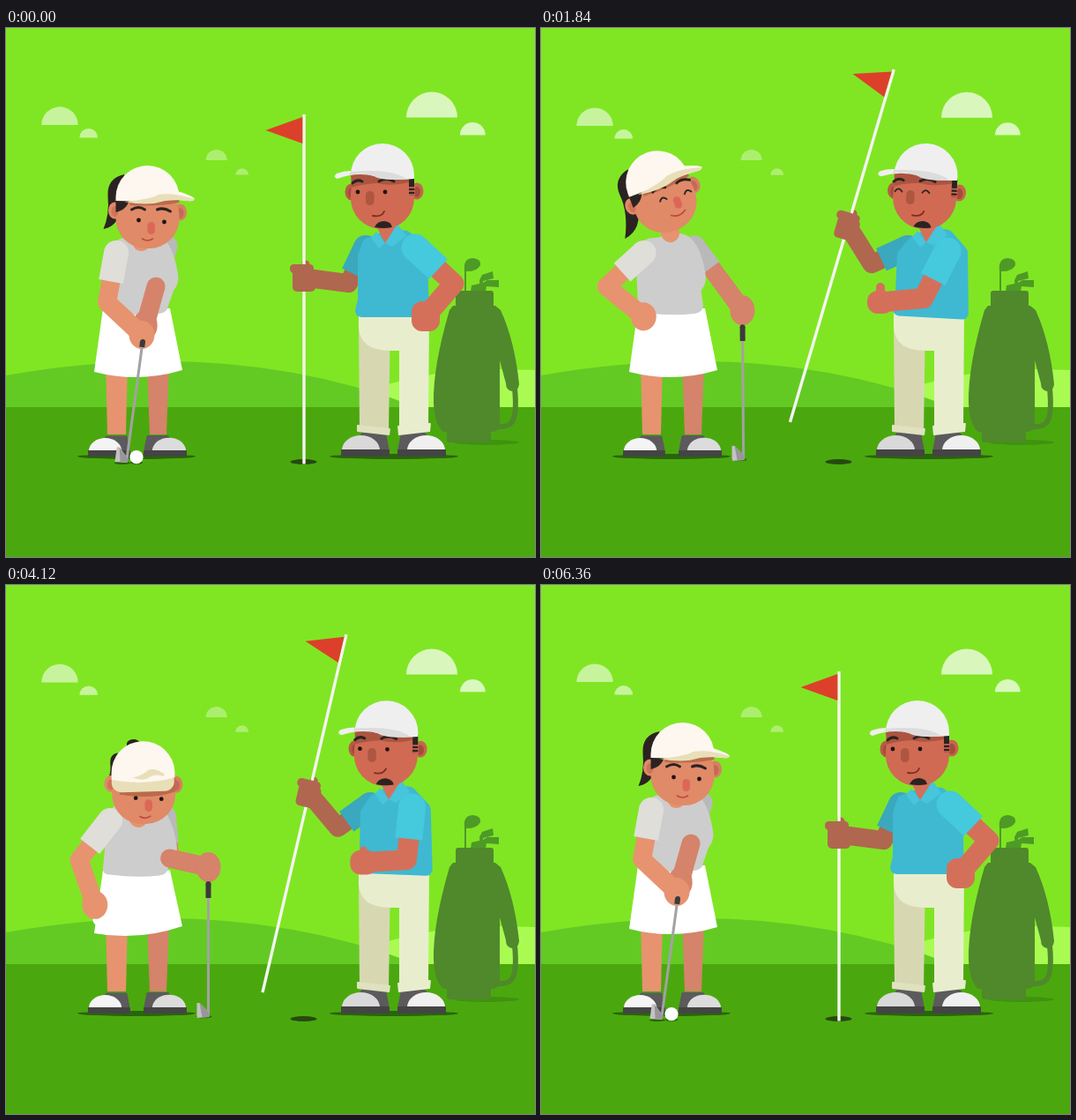
An HTML page with a canvas for the animation above (6.4 s loop, 600 px wide and 600 px high).

```html
<!DOCTYPE html>
<html lang="en">
<head>
<meta charset="utf-8">
<title>Putting green</title>
<style>
html, body { margin: 0; width: 100%; height: 100%; overflow: hidden; background: #80e623; }
canvas { display: block; width: 600px; height: 600px; }
</style>
</head>
<body>
<canvas id="stage" width="600" height="600"></canvas>
<script>
const c = document.getElementById('stage').getContext('2d');
const LOOP = 6400, STEP = 40;
const DARK = '#2b2322', SHADE = '#2a640b';

// ---- drawing ----
function shape(fill, d) {
  c.fillStyle = fill;
  c.fill(new Path2D(d));
}
function curve(color, w, d, cap = 'round') {
  c.strokeStyle = color;
  c.lineWidth = w;
  c.lineCap = cap;
  c.lineJoin = 'round';
  c.stroke(new Path2D(d));
}
function poly(fill, p, r = 0) {
  const n = p.length;
  c.beginPath();
  c.moveTo((p[0] + p[n - 2]) / 2, (p[1] + p[n - 1]) / 2);
  for (let i = 0; i < n; i += 2) c.arcTo(p[i], p[i + 1], p[(i + 2) % n], p[(i + 3) % n], r);
  c.fillStyle = fill;
  c.fill();
}
const box = (fill, x, y, w, h, r) => poly(fill, [x, y, x + w, y, x + w, y + h, x, y + h], r);
function oval(fill, x, y, rx, ry = rx) {
  c.beginPath();
  c.ellipse(x, y, rx, ry, 0, 0, 7);
  c.fillStyle = fill;
  c.fill();
}
function local(x, y, deg, draw) {
  c.save();
  c.translate(x, y);
  c.rotate(deg * Math.PI / 180);
  draw();
  c.restore();
}
function above(y, draw) {
  c.save();
  c.beginPath();
  c.rect(0, 0, 600, y);
  c.clip();
  draw();
  c.restore();
}

// ---- motion ----
const clamp = u => Math.min(1, Math.max(0, u));
const ease = u => u * u * (3 - 2 * u);
const lerp = (a, b, u) => a + (b - a) * u;
function mix(a, b, u) {
  const pose = {};
  for (const k in a) pose[k] = lerp(a[k], b[k], u);
  return pose;
}
// Each move is [start, end, pose]; between moves the pose holds.
const poseAt = (start, moves, t) => moves.reduce(
  (p, [from, to, next]) => mix(p, next, ease(clamp((t - from) / (to - from)))), start);

// Two-bone arm: shoulder, elbow, hand. The sign of bend picks the elbow's side.
function joints(sx, sy, hx, hy, upper, lower, bend) {
  const d = Math.hypot(hx - sx, hy - sy), ux = (hx - sx) / d, uy = (hy - sy) / d;
  const reach = Math.min(d, upper + lower);
  const a = (upper ** 2 - lower ** 2 + reach ** 2) / (2 * reach);
  const h = bend * Math.sqrt(Math.max(0, upper ** 2 - a ** 2));
  return [sx, sy, sx + ux * a + uy * h, sy + uy * a - ux * h, hx, hy];
}
const arm = (color, a, w) => curve(color, w, `M${a[0]} ${a[1]}L${a[2]} ${a[3]}L${a[4]} ${a[5]}`);
const forearm = (color, a, w) => curve(color, w, `M${a[2]} ${a[3]}L${a[4]} ${a[5]}`);
function sleeve(color, [sx, sy, ex, ey], w, len) {
  const k = len / Math.hypot(ex - sx, ey - sy);
  oval(color, sx, sy, w / 2);
  curve(color, w, `M${sx} ${sy}L${lerp(sx, ex, k)} ${lerp(sy, ey, k)}`, 'butt');
}

// ---- poses: head x, y, tilt; near hand nx, ny; club grip gx, gy, angle, length; far elbow bend ----
const address = { x: 160.5, y: 192, tilt: 0, nx: 154, ny: 348, gx: 155, gy: 356, swing: 7.7, len: 135, bend: 1 };
const back = { ...address, x: 155.5, tilt: -2, nx: 152, gx: 152, gy: 357, swing: 15.6 };
const through = { x: 141, y: 184, tilt: -18, nx: 179, ny: 338, gx: 183, gy: 348, swing: -20.7, len: 136, bend: 1 };
const rest = { x: 132, y: 175, tilt: -21, nx: 115, ny: 327, gx: 229.5, gy: 339, swing: 0, len: 148, bend: 0 };
const pocket = { ...rest, x: 143, y: 179, tilt: -13, nx: 87, ny: 330, bend: -1 };
const bowed = { ...pocket, x: 162, y: 231, tilt: 4, nx: 108, ny: 380 };
const herMoves = [[60, 440, back], [440, 900, through], [1180, 1900, rest], [2760, 3400, pocket],
  [3720, 4380, bowed], [4660, 5200, back], [5500, 6080, address]];

// head x, y, tilt; body turn and lean; pole hand hx, hy and pole angle
const hold = { x: 427, y: 167, tilt: 0, turn: 0, lean: 0, hx: 338, hy: 283, angle: 0 };
const lift = { ...hold, x: 420, y: 169, tilt: -8, lean: 1, hx: 342, hy: 250, angle: .7 };
const cheer = { x: 436.5, y: 167, tilt: 3, turn: 1, lean: 0, hx: 348, hy: 224.5, angle: 16.4 };
const sway = { ...cheer, hx: 345.5, hy: 221.5, angle: 17 };
const watch = { ...hold, x: 414, y: 168.5, tilt: -5, lean: -5 };
const plant = { ...watch, hy: 287 };
const hisMoves = [[620, 1080, lift], [1080, 1840, cheer], [2540, 2740, sway], [3960, 4480, plant],
  [4600, 4760, watch], [5500, 6080, hold]];

// ---- scenery ----
function cloud(x, y, r, alpha) {
  shape(`rgba(255,255,255,${alpha})`, `M${x - r} ${y}A${r} ${r} 0 0 1 ${x + r} ${y}Z`);
}
function scenery(t) {
  const bob = lag => -Math.cos(2 * Math.PI * (3 * t / LOOP - lag));
  c.fillStyle = '#80e623';
  c.fillRect(0, 0, 600, 600);
  const left = bob(.08) * 1.6, right = bob(-.04) * 1.25, mid = bob(.4) * .4;
  cloud(61, 111.4 + left, 20.7, .55);
  cloud(93.7, 125.8 + left, 10.4, .55);
  cloud(483, 102.8 + right, 29, .7);
  cloud(529.3, 122.6 + right, 14.4, .7);
  cloud(238.7, 149.7 + mid, 12, .35);
  cloud(267.7, 166.3 + mid, 7.4, .35);

  shape('#a9fb52', 'M420 408Q490 386 560 387L600 388V430H420Z');
  shape('#63ca24', 'M0 394Q90 378 178 378Q330 378 466 430H0Z');
  c.fillStyle = '#4aa80e';
  c.fillRect(0, 430, 600, 170);

  oval('#3f930f', 545, 470, 37, 3);
  oval(SHADE, 440, 486, 73, 3);
  oval(SHADE, 148, 486, 67, 3);
  oval('#27490f', 337.5, 492, 15, 3);
}
function bag() {
  const g = '#50882c', lit = '#4d9a26';
  curve(lit, 2, 'M521 300V268', 'butt');
  shape(lit, 'M520 276Q518 261 530 261Q539 262 538 269Q534 277 520 276Z');
  shape(lit, 'M537 286L540 280L552 276L553 284L541 287V299H538Z');
  shape(lit, 'M527 299L528 292L541 289L546 286H559V294L545 293L544 299Z');
  box(g, 510, 298, 43, 22, 3);
  shape(g, 'M507 315H555L560 321V450Q559 458 551 458H496Q486 450 485 425Q484 385 503 320Z');
  shape(g, 'M556 316L561 320Q577 355 582 404Q581 412 574 412Q567 411 567 403L556 362Z');
  curve(g, 6, 'M577 409Q580 440 573 448Q568 453 557 452');
  box(g, 500, 455, 50, 15, 3);
}
function shoe(x, dir, size, toe) {
  c.save();
  c.translate(x, 486);
  c.scale(dir * size, size);
  poly('#5c5a5c', [23, -27, 51, -27, 55, -6, 15, -6], 2);
  shape(toe, 'M1 -7A21.5 17 0 0 1 44 -7Z');
  box('#444', 0, -8, 55, 8, 1);
  c.restore();
}

// ---- faces ----
function eyes(ax, ay, bx, by, happy) {
  for (const [x, y] of [[ax, ay], [bx, by]]) {
    if (happy) curve(DARK, 1.8, `M${x - 4} ${y + 1}Q${x} ${y - 5} ${x + 4} ${y + 1}`);
    else oval('#1c1514', x, y, 2.4);
  }
}
function ear(skin, inner, x, y) {
  oval(skin, x, y, 7.5, 9.5);
  oval(inner, x, y + 1, 4, 6);
}

function manHead({ x, y, tilt, turn }, happy) {
  local(x, y, tilt, () => {
    ear('#b95a46', '#a34c3a', -35, 19);
    ear('#c9634d', '#a34c3a', 39, 18);
    box('#d06a53', -36, -14, 72, 75, 35);
    shape('#ab5541', 'M-36 -2H30V8Q8 13 -6 9Q-24 10 -35 14Z');
    box(DARK, 30, 2, 6, 21, 0);
    for (const k of [14, 18, 22]) curve('#d06a53', 1.6, `M29 ${k}H37`, 'butt');
    local(-2 * turn, 0, 0, () => {
      eyes(-28, 19, 3, 19, happy);
      curve(DARK, 3, 'M-34 9Q-29 4 -23 7M-4 7Q4 2 13 7');
      box('#ae5640', -19, 18, 9.5, 16, 4.5);
      curve('#7e2c20', 1.8, 'M-11 46Q-1 48 2 41');
      shape(DARK, 'M-9 59Q-6 52 2 52Q10 53 11 59Q1 61 -9 59Z');
    });
    shape('#efefef', 'M-36 -5V0A36 36 0 0 1 36 0V4Q5 7 -8 1Q-30 -4 -51 4Q-57 2 -52 -2Q-44 -5 -36 -5Z');
    shape('#dcdcdc', 'M-36 -4Q10 -8 27 4Q0 7 -10 1Q-24 -4 -38 0Z');
  });
}

function womanHead({ x, y, tilt }, bow, happy) {
  local(x, y, tilt, () => {
    ear('#d67f62', '#c56a52', 37, 17 - 5 * bow);
    box('#e08a68', -36, -14, 72, 72, 34);
    ear('#e08a68', '#cf7459', -37, 15 - 7 * bow);
    if (bow < .5) shape(DARK, 'M-36 0H-20Q-22 14 -36 17Z');
    shape('#bb6a4b', `M-20 2H36V${6 + 30 * bow}Q10 ${11 + 37 * bow} ${-20 - 14 * bow} ${9 + 27 * bow}Z`);
    local(-.43 * tilt, .27 * tilt + 5 * bow, 0, () => {
      eyes(-10, 26, 19, 28, happy);
      curve(DARK, 3, 'M-18 14Q-10 9 -3 14M11 14Q18 11 26 16');
      box('#dc6757', 0, 28, 8.5, 14, 4.2);
      curve('#c0463c', 1.6, happy ? 'M-8 46Q0 52 9 46' : 'M-6 47Q0 51 6 47');
    });
    if (bow > 0) box('#e8dfb8', -36, -2, 71, 43 * bow, 20 * bow);
    c.save();
    c.scale(1 - bow, 1);
    shape('#fdf7ef', 'M30 -8Q46 -4 53 1Q54 5 46 4L20 2Z');
    c.restore();
    shape('#fdf7ef', `M-36 4V0A36 36 0 0 1 36 0V${3 + 6 * bow}Q0 ${5 + 18 * bow} -36 ${4 + 5 * bow}Z`);
    c.scale(1 - bow, 1);
    shape('#e8dfb8', 'M-26 5Q4 2 12 -3Q28 -6 53 2Q52 5 46 4Q28 1 16 5Q0 10 -26 5Z');
  });
}
function ponytail({ x, y, tilt }, bow) {
  const tipX = -50 + .35 * tilt, tipY = 36 - .5 * tilt;
  local(x, y, tilt, () => {
    oval(DARK, -10, -33, 14 * bow, 10 * bow);
    c.translate(-30 * bow, -22 * bow);
    c.scale(1 - bow, 1 - bow);
    shape(DARK, `M-26 -26Q-46 -22 -45 -2Q-43 20 ${tipX} ${tipY}Q-34 ${tipY - 3} -30 14Z`);
  });
}

// ---- golfers ----
function manLegs() {
  shoe(380, 1, 1, '#d9d9d9');
  shoe(499, -1, 1, '#f0f0f0');
  poly('#d7d8b2', [400, 326, 436, 326, 434, 458, 401, 456]);
  poly('#dfe1bf', [398, 450, 436, 454, 435, 462, 398, 458], 1);
  shape('#e8eecd', 'M400 322H480L479 452L446 454V366H436Q402 366 400 340Z');
  poly('#e8eecd', [444, 451, 482, 448, 481, 458, 445, 462], 1);
}
function shirt(turn, lean) {
  const front = [405, 240, 436, 228, 456, 230, 478, 250, 480, 328, 394, 328, 399, 308, 399, 258];
  const turned = [418, 238, 441, 226, 464, 229, 484, 252, 485, 331, 398, 326, 402, 300, 404, 255];
  c.save();
  c.transform(1, lean / 150, -lean / 90, 1, lean * 328 / 90, -lean * 440 / 150);
  poly('#3eb9d1', front.map((v, i) => lerp(v, turned[i], turn)), 7);
  c.restore();
  local(432 + 7 * turn + lean, 236 - turn, 0, () => {
    poly('#d4705a', [-13, -14, 12, -14, 10, -4, -2, 9]);
    poly('#47c5da', [-12, -5, -2, 8, -9, 14, -18, 2]);
    poly('#47c5da', [12, -14, 22, 0, 6, 12, -2, 8]);
  });
}
function man(t) {
  const pose = poseAt(hold, hisMoves, t), { turn, lean, hx, hy, angle } = pose;
  const px = lerp(476, 385, turn), py = lerp(327, 311, turn);
  const far = joints(408 + 8 * turn + lean, 249, hx, hy, 45, 51, 1);
  const near = joints(464 - 3 * turn + lean, 249 + 4 * turn, px, py, 60, 49, 1);
  const skin = '#d4705a', dim = '#b0674f';

  manLegs();
  arm(dim, far, 21);
  sleeve('#3aa8bd', far, 28, 33);
  shirt(turn, lean);
  manHead(pose, t >= 1560 && t < 4000);

  arm(skin, near, 23);
  sleeve('#45c9dc', near, 31, 36);
  box(skin, px - 16 + turn, py - 17 + 4 * turn, 32 - 2 * turn, 34 - 8 * turn, 12);
  if (turn > 0) curve(skin, 10 * turn, `M${px} ${py - 5}V${py - 5 - 12 * turn}`);

  above(494.5, () => local(hx, hy, angle, () => {
    curve(dim, 9, 'M2 -14V-15');
    curve('#f4f4f0', 3.4, 'M0 -185V232', 'butt');
    poly('#dd402a', [-1.7, -182, -1.7, -152, -43.5, -167]);
    box(dim, -13, -9, 26, 25, 5);
    box(dim, -16, -15, 27, 10, 4.5);
  }));
}

function drawClub({ gx, gy, swing, len }) {
  const a = swing * Math.PI / 180, x = gx - len * Math.sin(a), y = gy + len * Math.cos(a);
  oval(SHADE, x - 5, 499 - .041 * x, 9, 1.7);
  local(x, y, swing, () => {
    curve('#a3a1a3', 3, `M0 0V${-len}`, 'butt');
    curve('#3c3a3c', 6, `M0 ${-len}V${-len + Math.max(6, len - 132)}`, 'butt');
    oval('#3c3a3c', 0, -len, 3);
    poly('#c4c2c4', [-13, -13, -10, -13, 1, -2, 1, 3, -13, 4]);
    poly('#989698', [-10, -13, 1, -2, 1, 3, -7, 3.5]);
  });
}
function blouse(cx, cy, low, bow) {
  const top = cy - 13 - 14 * bow;
  shape('#cdcdcd', `M110 ${low - 8}L${cx - 36} ${cy + 8}Q${cx - 34} ${top} ${cx - 14} ${top}
    L${cx + 14} ${cy - 18}Q${cx + 36} ${cy - 16} ${cx + 43} ${cy + 28}
    Q${cx + 45} ${cy + 38} ${cx + 38} ${cy + 47}L184 ${low - 8}
    Q183 ${low} 174 ${low + 1}Q148 ${low + 4} 118 ${low}Q109 ${low} 110 ${low - 8}Z`);
}
function woman(t) {
  const pose = poseAt(address, herMoves, t), { x, y, tilt, nx, ny, gx, gy, swing, bend } = pose;
  const bow = clamp((y - 192) / 39), low = 323 + 10 * bow;
  const cx = 145 + (x - 137) * .3, cy = 251 + 28 * bow;
  const a = swing * Math.PI / 180, wx = gx + 20 * Math.sin(a), wy = gy - 19 * Math.cos(a);
  const near = joints(cx - 27 - 10 * bow, cy + 4 - 6 * bow, nx, ny, 57, 54, -1);
  const far = joints(cx + 31, cy - 4, wx, wy, 48, 45, bend);
  const skin = '#e7936f', dim = '#d5836a';

  shoe(93, 1, .87, '#f4f4f4');
  shoe(205, -1, .89, '#dcdcdc');
  poly(skin, [113, 380, 138, 380, 136, 461, 115, 461]);
  poly(dim, [160, 380, 185, 380, 182, 461, 163, 461]);
  shape('#fff', `M110 ${low - 5}L100 ${390 + 9 * bow}Q150 ${403 + 2 * bow} 200 ${388 - 2 * bow}L186 ${low - 5}Z`);

  ponytail(pose, bow);
  arm(dim, far, 21);
  sleeve('#b9b9b9', far, 23, 31);
  blouse(cx, cy, low, bow);
  forearm(dim, far, 21);
  oval(dim, wx, wy, 14, 17);
  local(x, y, tilt, () => oval(skin, -7, 50 - .4 * tilt, 10.5, 11));

  if (t >= 3440 && t < 4360) ball(nx + 5, ny + 16);
  arm(skin, near, 21);
  oval(skin, nx, ny, 14.5, 16);
  sleeve('#dfded9', near, 28, 33 + 8 * bow);
  womanHead(pose, bow, t >= 1560 && t < 3160);
  drawClub(pose);
}

// ---- ball ----
const ball = (x, y) => oval('#fff', x, y, 7.6);
function groundBall(t) {
  if (t >= 1320 && t < 4360) return;
  const fall = clamp((t - 4360) / 160), roll = t < 1320 ? clamp((t - 610) / 640) : 0;
  const sink = t < 1320 ? clamp((t - 1180) / 140) : 0;
  const x = t < 1320 ? 148 + 190 * (1 - (1 - roll) ** 1.3) : lerp(118, 148, fall);
  const y = t < 1320 ? 486.7 + 20 * sink ** 2 : lerp(398, 486.7, fall ** 2);
  above(495, () => {
    if (!sink && (t < 1320 || fall === 1)) oval(SHADE, x, 493, 7, 1.7);
    ball(x, y);
  });
}

function frame() {
  const t = Math.floor(performance.now() % LOOP / STEP) * STEP;
  scenery(t);
  bag();
  woman(t);
  groundBall(t);
  man(t);
  requestAnimationFrame(frame);
}
frame();
</script>
</body>
</html>
```
